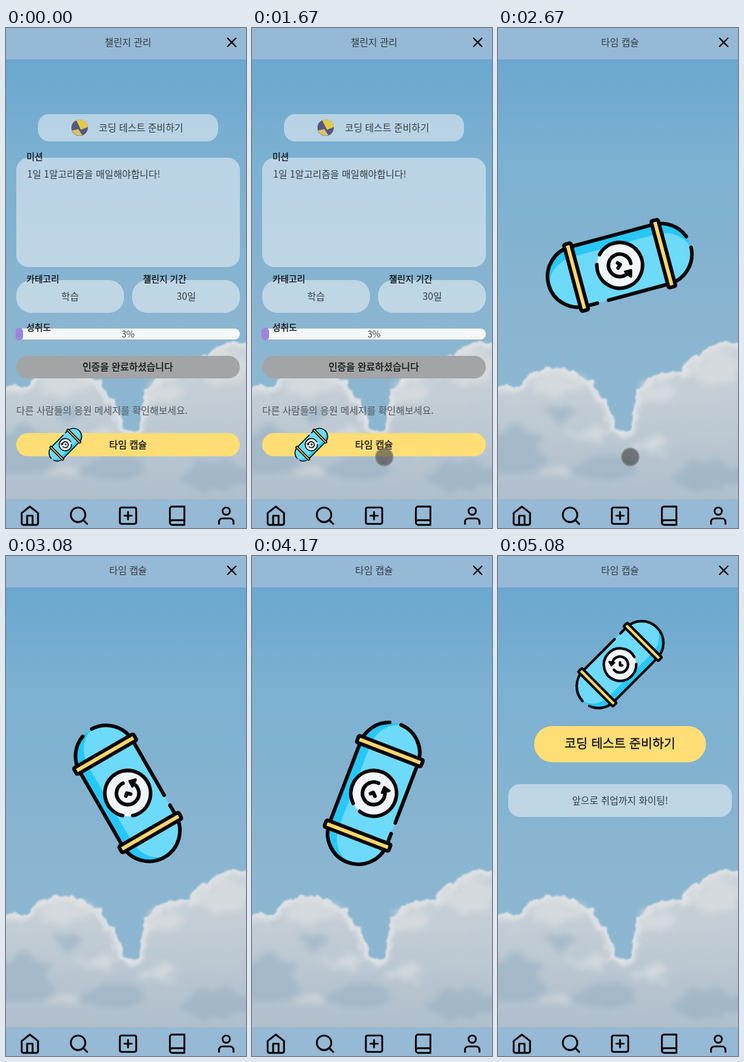
An HTML page for the animation above (7080 ms loop, 352 px wide and 732 px high).

```html
<!DOCTYPE html>
<html lang="ko">
<head>
<meta charset="utf-8">
<title>타임 캡슐</title>
<style>
html, body { margin: 0; width: 100%; height: 100%; overflow: hidden; }
svg { display: block; width: 352px; height: 732px; }
text { font: 14px "Noto Sans CJK KR", "Noto Sans CJK", "Noto Sans CJK JP", sans-serif; font-weight: 300; fill: #353c43; }
.mid { text-anchor: middle; }
.label { font-size: 13px; }
.label, .btn { fill: #111; stroke: #111; stroke-width: .3; }
.glass { fill: #f4f6f8; fill-opacity: .52; }
.line { fill: none; stroke: #000; stroke-width: 5.3; stroke-linecap: round; stroke-linejoin: round; }
.band { fill: #ffd868; }
.icons { fill: none; stroke: #000; stroke-width: 2; stroke-linecap: round; stroke-linejoin: round; }
</style>
</head>
<body>
<svg viewBox="0 0 352 732">
  <defs>
    <linearGradient id="sky" x2="0" y2="1">
      <stop offset="0" stop-color="#66a4ce"/>
      <stop offset=".25" stop-color="#7bb0d1"/>
      <stop offset=".6" stop-color="#8ab5d0"/>
      <stop offset="1" stop-color="#8fb7d0"/>
    </linearGradient>
    <linearGradient id="haze" x2="0" y2="1">
      <stop offset="0" stop-color="#ced5db"/>
      <stop offset=".45" stop-color="#bcc8d2"/>
      <stop offset="1" stop-color="#a6b8c7"/>
    </linearGradient>
    <filter id="puff" x="-10%" y="-10%" width="120%" height="120%">
      <feTurbulence type="fractalNoise" baseFrequency=".05" numOctaves="3" seed="4"/>
      <feDisplacementMap in="SourceGraphic" scale="18" xChannelSelector="R" yChannelSelector="G"/>
      <feGaussianBlur stdDeviation="1.3"/>
    </filter>
    <filter id="soft" x="-20%" y="-20%" width="140%" height="140%">
      <feTurbulence type="fractalNoise" baseFrequency=".04" numOctaves="3" seed="9"/>
      <feDisplacementMap in="SourceGraphic" scale="34" xChannelSelector="R" yChannelSelector="G"/>
      <feGaussianBlur stdDeviation="5"/>
    </filter>
    <filter id="blur"><feGaussianBlur stdDeviation="4"/></filter>
    <path id="cloud" d="M-30 528L30 524 44 506 70 499 98 498 118 508 140 516 152 538 166 560 174 588 188 590 196 570 204 536 216 515 242 505 270 502 282 486 306 470 330 461 390 454V760H-30z"/>
    <clipPath id="inCloud"><use href="#cloud"/></clipPath>
    <clipPath id="plus"><path d="M0-60H130V60H0z"/></clipPath>
    <clipPath id="minus"><path d="M0-60H-130V60H0z"/></clipPath>

    <!-- Capsule lying along the x axis, centred on its clock -->
    <g id="capsule">
      <rect x="-108" y="-45" width="216" height="90" rx="45" fill="#28c7f6"/>
      <path d="M-63-45H63A44 37 0 0 1 63 30H-63A44 37 0 0 1-63-45z" fill="#6ddafa"/>
      <path id="shell" class="line"/>
      <g class="line">
        <rect class="band" x="-71.5" y="-50.5" width="10.5" height="101" rx="2"/>
        <rect class="band" x="61" y="-50.5" width="10.5" height="101" rx="2"/>
        <circle r="33.5" stroke="none" fill="#f2f6fd"/>
        <path id="dial"/>
        <g transform="rotate(45)">
          <path id="hand"/>
          <path d="M0-4.5V1.5H4.5"/>
          <path d="M-22.5-6L-11.5-4-18 2z" fill="#000" stroke-width="3.5"/>
        </g>
      </g>
    </g>
  </defs>

  <rect width="352" height="732" fill="url(#sky)"/>
  <g filter="url(#puff)">
    <use href="#cloud" fill="url(#haze)"/>
    <g clip-path="url(#inCloud)">
      <use href="#cloud" fill="none" stroke="#dfe2e4" stroke-width="18" filter="url(#blur)"/>
    </g>
  </g>
  <g filter="url(#soft)">
    <g fill="#98b0c2" opacity=".6">
      <ellipse cx="22" cy="620" rx="46" ry="36"/>
      <ellipse cx="160" cy="645" rx="46" ry="20"/>
      <ellipse cx="310" cy="655" rx="50" ry="22"/>
      <ellipse cx="95" cy="565" rx="22" ry="9"/>
    </g>
    <g fill="#d8dcdf" opacity=".75">
      <ellipse cx="92" cy="522" rx="38" ry="14"/>
      <ellipse cx="88" cy="650" rx="28" ry="9"/>
      <ellipse cx="235" cy="535" rx="28" ry="14"/>
      <ellipse cx="322" cy="500" rx="32" ry="22"/>
      <ellipse cx="130" cy="596" rx="26" ry="10"/>
      <ellipse cx="225" cy="610" rx="30" ry="10"/>
    </g>
  </g>

  <g id="manage">
    <rect class="glass" x="47" y="126" width="264" height="40" rx="16"/>
    <circle cx="108" cy="146" r="12" fill="#55587a"/>
    <path d="M103 135A12 12 0 0 1 120 145L110 149z" fill="#e3c94e"/>
    <path d="M97 150A12 12 0 0 0 112 157L106 148z" fill="#d9c26a"/>
    <text x="136" y="151">코딩 테스트 준비하기</text>
    <rect class="glass" x="15" y="190" width="328" height="160" rx="18"/>
    <text class="label" x="30" y="193">미션</text>
    <text x="31" y="219">1일 1알고리즘을 매일해야합니다!</text>
    <rect class="glass" x="15" y="369" width="158" height="48" rx="22"/>
    <rect class="glass" x="185" y="369" width="158" height="48" rx="22"/>
    <text class="label" x="30" y="372">카테고리</text>
    <text class="label" x="201" y="372">챌린지 기간</text>
    <text class="mid" x="94" y="398">학습</text>
    <text class="mid" x="264.5" y="398">30일</text>
    <rect x="15" y="440" width="328" height="16" rx="8" fill="#f5f7f8"/>
    <rect x="14" y="439" width="11" height="18" rx="5" fill="#9d85dc"/>
    <text class="label" x="30" y="443">성취도</text>
    <text class="mid" x="179" y="453" style="font-size:13px">3%</text>
    <rect x="15" y="480" width="328" height="33" rx="16.5" fill="#a3a4a6"/>
    <text class="btn mid" x="178.5" y="501">인증을 완료하셨습니다</text>
    <text x="15" y="565" style="fill:#50565c">다른 사람들의 응원 메세지를 확인해보세요.</text>
    <rect x="15" y="593" width="328" height="34" rx="17" fill="#ffde76"/>
    <text class="btn mid" x="179" y="615">타임 캡슐</text>
    <use href="#capsule" transform="translate(87 610) scale(.267) rotate(-45)"/>
  </g>

  <use id="spin" href="#capsule"/>
  <g id="left"><use href="#capsule" clip-path="url(#plus)"/></g>
  <g id="right"><use href="#capsule" clip-path="url(#minus)"/></g>

  <g id="opened">
    <use href="#capsule" transform="translate(179 159) scale(.71) rotate(-45)"/>
    <rect x="53" y="249" width="252" height="53" rx="26.5" fill="#ffde76"/>
    <text class="btn mid" x="179" y="281" style="font-size:18.4px">코딩 테스트 준비하기</text>
    <rect class="glass" x="15" y="334" width="328" height="48" rx="17"/>
    <text class="mid" x="179" y="363">앞으로 취업까지 화이팅!</text>
  </g>

  <path d="M0 0H352V46H0zM0 690H352V732H0z" fill="#96b9d5"/>
  <text id="title" class="mid" x="179" y="26"></text>
  <path d="M325 15L337 27M337 15L325 27" class="icons"/>
  <g class="icons">
    <g transform="translate(19 698) scale(1.333)"><path d="M3 9L12 2 21 9V20A2 2 0 0 1 19 22H5A2 2 0 0 1 3 20zM9 22V12H15V22"/></g>
    <g transform="translate(91 698) scale(1.333)"><circle cx="11" cy="11" r="8"/><path d="M21 21L16.65 16.65"/></g>
    <g transform="translate(163 698) scale(1.333)"><rect x="3" y="3" width="18" height="18" rx="2"/><path d="M12 8V16M8 12H16"/></g>
    <g transform="translate(235 698) scale(1.333)"><path d="M4 19.5A2.5 2.5 0 0 1 6.5 17H20M6.5 2H20V22H6.5A2.5 2.5 0 0 1 4 19.5V4.5A2.5 2.5 0 0 1 6.5 2z"/></g>
    <g transform="translate(307 698) scale(1.333)"><path d="M20 21V19A4 4 0 0 0 16 15H8A4 4 0 0 0 4 19V21"/><circle cx="12" cy="7" r="4"/></g>
  </g>
  <circle id="cursor" cx="194" r="12.2" fill="#3c3c3c" fill-opacity=".6" stroke="#777" stroke-opacity=".6" stroke-width="3"/>
</svg>
<script>
const LOOP = 7080, FPS = 12, LAST = 61;
const OPEN = 27, SPLIT = 51, DONE = 56;
const $ = id => document.getElementById(id);
const show = (id, on) => $(id).style.display = on ? '' : 'none';
const place = (id, x, y, turn) =>
  $(id).setAttribute('transform', `translate(${x} ${y}) rotate(${turn - 45})`);

function polar(radius, deg, cx = 0) {
  const a = deg * Math.PI / 180;
  return `${cx + radius * Math.cos(a)} ${radius * Math.sin(a)}`;
}
const arc = (radius, from, to, cx) =>
  `${polar(radius, from, cx)}A${radius} ${radius} 0 ${to - from > 180 ? 1 : 0} 1 ${polar(radius, to, cx)}`;

// Outlines with their small gaps
$('shell').setAttribute('d',
  `M46-45H63A45 45 0 0 1 63 45H-63L${arc(45, 90, 160, -63)}` +
  `M${arc(45, 182, 270, -63)}H29`);
$('dial').setAttribute('d', 'M' + arc(33.5, 43, 377));
$('hand').setAttribute('d', 'M' + arc(16.5, 195, 500));

function cursorY(k) {
  if (k < 18) return 628 + 7 * (18 - k) ** 2;
  if (k > 33) return 628 + 28 * (k - 33) ** 2;
  return 628;
}

function draw(k) {
  show('manage', k < OPEN);
  show('spin', k >= OPEN && k < SPLIT);
  show('left', k >= SPLIT && k < DONE);
  show('right', k >= SPLIT && k < DONE);
  show('opened', k >= DONE);
  $('title').textContent = k < OPEN ? '챌린지 관리' : '타임 캡슐';

  const n = k - 32;
  place('spin', 178.5, 347.5, 210 + 41 * n + 2 * n * n);
  const u = (k - SPLIT) / 2;
  place('left', 178.5 - 127.5 * u, 347.5 + 50.5 * u * u, 225 - 105 * u);
  place('right', 178.5 + 165 * u, 347.5 + 90 * u * u, 225 + 119 * u);

  $('cursor').setAttribute('cy', cursorY(k));
}

const start = performance.now();
let shown = -1;
function tick() {
  const t = (performance.now() - start) % LOOP;
  const k = Math.min(LAST, Math.floor((t + 5) * FPS / 1000));
  if (k !== shown) draw(shown = k);
  requestAnimationFrame(tick);
}
tick();
</script>
</body>
</html>
```
